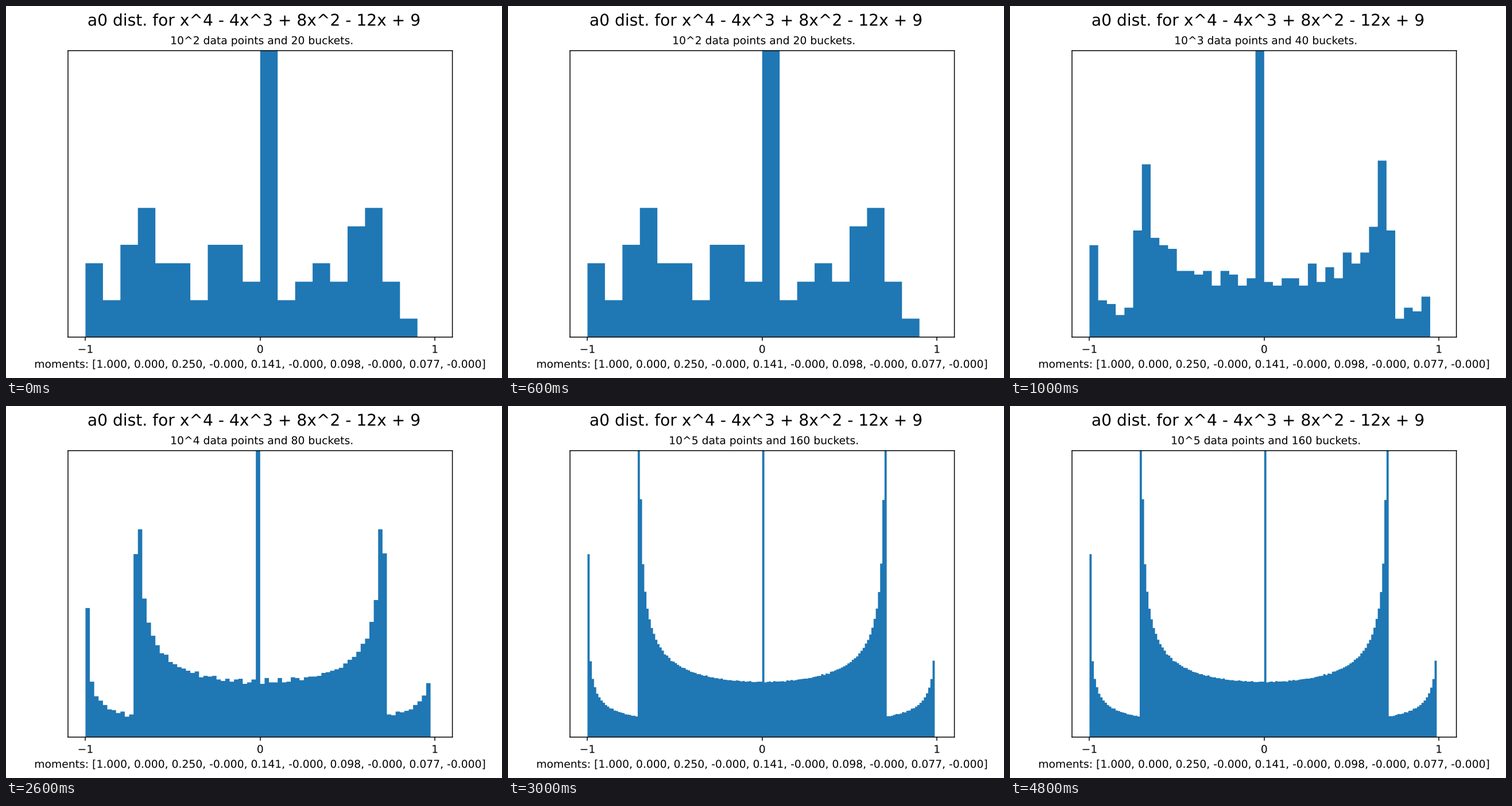
Recreate the animation shown at these times as a matplotlib script. Size 864 by 648 pixels, loop 6 s.

```python
import numpy as np
import matplotlib.pyplot as plt
from matplotlib.animation import FuncAnimation
from matplotlib.patheffects import Normal

# Subpixel placement: unsnapped edges, and text drawn as unhinted outlines.
plt.rcParams.update({
    "font.family": "DejaVu Sans",
    "text.hinting": "no_hinting",
    "path.snap": False,
    "path.effects": [Normal()],
})

POLYNOMIAL = "x^4 - 4x^3 + 8x^2 - 12x + 9"
MOMENTS = "[1.000, 0.000, 0.250, -0.000, 0.141, -0.000, 0.098, -0.000, 0.077, -0.000]"
LAST_LEVEL = 3

# The roots are sqrt(3) * exp(+-i*THETA) and sqrt(3) * exp(+-i*(pi/2 - THETA)).
THETA = np.arccos((2 + np.sqrt(2)) / (2 * np.sqrt(3)))


def normalized_traces(count):
    """Sums of r-th powers of the roots, scaled to [-1, 1], for r = 1..count."""
    r = np.arange(1, count + 1)
    c, s = np.cos(r * THETA), np.sin(r * THETA)
    return np.choose(r % 4, [c, (c + s) / 2, np.zeros(count), (c - s) / 2])


def histogram(level):
    exponent, buckets = level + 2, 20 * 2**level
    # The open-ended range leaves out the bucket next to 1.
    edges = np.arange(-1, 1, 2 / buckets)
    density, _ = np.histogram(normalized_traces(10**exponent), edges, density=True)
    return exponent, buckets, edges, density


LEVELS = [histogram(level) for level in range(LAST_LEVEL + 1)]

fig, ax = plt.subplots(figsize=(6.4, 4.8), dpi=135)
fig.suptitle(f"a0 dist. for {POLYNOMIAL}", fontsize=15)


def update(second):
    exponent, buckets, edges, density = LEVELS[min(second, LAST_LEVEL)]
    ax.clear()
    ax.stairs(density, edges, fill=True, color="#1f77b4", linewidth=0)
    ax.set_xlim(-1.1, 1.1)
    ax.set_ylim(0, 1.6)
    ax.set_xticks([-1, 0, 1])
    ax.set_yticks([])
    ax.set_title(f" 10^{exponent} data points and {buckets} buckets.", fontsize=10)
    ax.set_xlabel(f"moments: {MOMENTS}")


animation = FuncAnimation(fig, update, frames=6, interval=1000,
                          init_func=lambda: None, repeat=True, repeat_delay=0)
plt.show()
```
